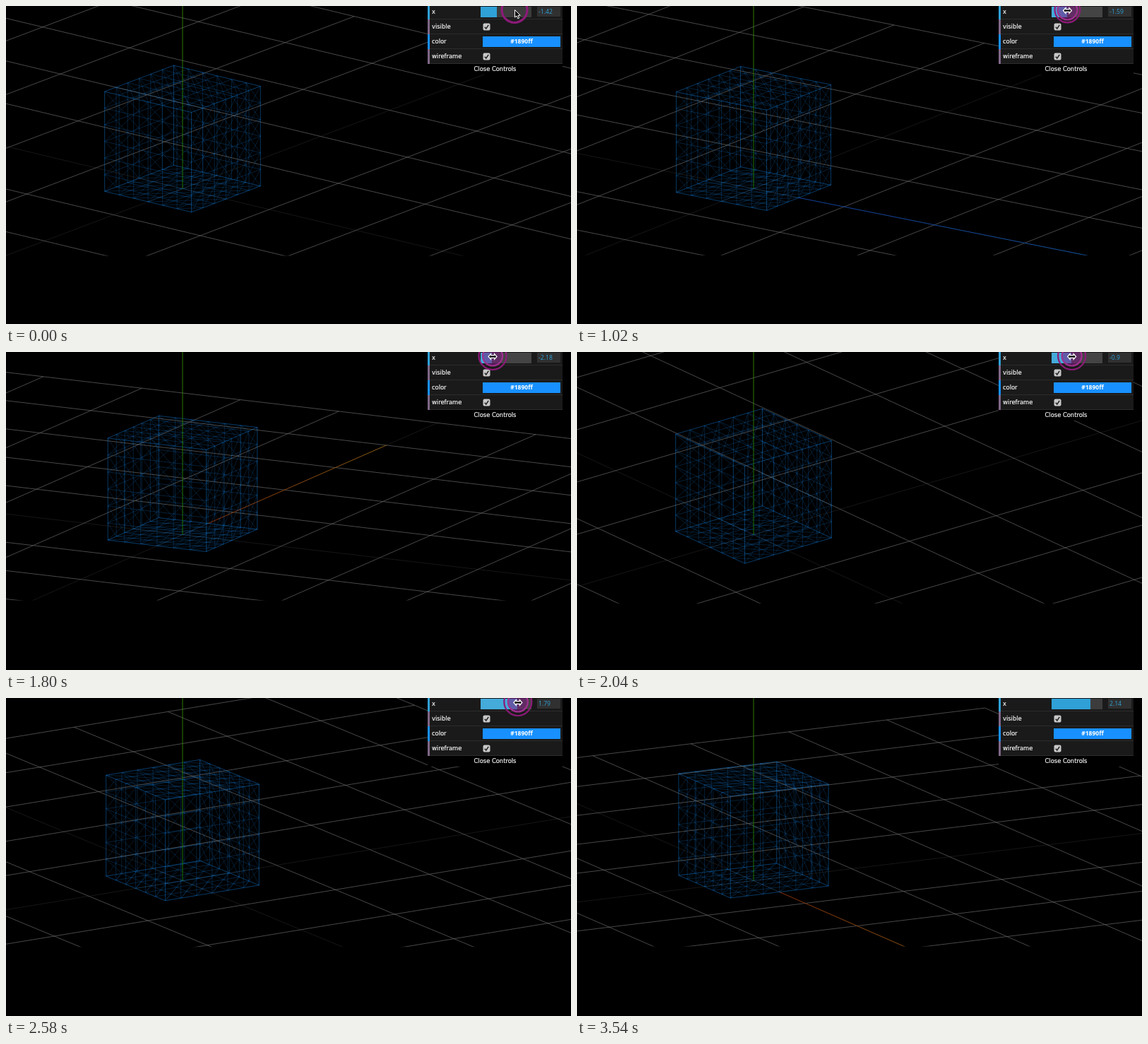
Write an HTML page with a canvas that moves like this. It is 800x450 px and loops after 3.84 s.

```html
<!DOCTYPE html>
<html lang="en">
<head>
<meta charset="utf-8">
<title>Orthographic camera</title>
<style>
html, body { margin: 0; width: 100%; height: 100%; overflow: hidden; background: #000; }
#stage { position: relative; width: 800px; height: 450px; overflow: hidden; }
#stage > * { position: absolute; }
canvas { left: 0; top: 0; }
#gui { left: 597px; top: -2px; width: 191px; font: 8.35px "DejaVu Sans", sans-serif; color: #f4f4f4;
  -webkit-text-stroke: .2px #f4f4f4; }
.row { position: relative; box-sizing: border-box; height: 21px; background: #1a1a1a;
  border-bottom: 1px solid #2c2c2c; }
.row::before { content: ""; position: absolute; width: 2.5px; height: 21px; background: #806787; }
.row > * { position: absolute; }
.row label { left: 6px; top: 0; line-height: 21px; }
.num::before { background: #2fa1d6; }
.hue::before { background: #1890ff; }
#track { left: 75px; top: 3px; width: 72px; height: 15px; background: #3c3c3c; }
#fill { height: 100%; background: #2fa1d6; }
.hover #track { background: #444; }
.hover #fill { background: #44abda; }
#value { left: 155px; top: 3px; width: 33px; height: 14px; padding-left: 2px; box-sizing: border-box;
  background: #303030; color: #2fa1d6; font: 8.6px/14px "Open Sans", sans-serif; -webkit-text-stroke: 0; }
#swatch { left: 78px; top: 3px; width: 110px; height: 14.5px; background: #1890ff; color: #fff;
  text-align: center; font: bold 8.5px/14px "Open Sans", sans-serif; -webkit-text-stroke: 0; }
.check { left: 78px; top: 5px; }
#close { height: 15px; line-height: 15.5px; background: #000; text-align: center; }
#cursor { left: 0; top: 0; overflow: visible; }
</style>
</head>
<body>
<div id="stage">
  <canvas id="view" width="800" height="450"></canvas>
  <div id="gui">
    <div class="row num"><label>x</label><div id="track"><div id="fill"></div></div><div id="value"></div></div>
    <div class="row"><label>visible</label>
      <svg class="check" width="11" height="11"><rect x=".5" y=".5" width="10" height="10" rx="2" fill="#c8c8c8"/><path d="M2.8 5.8 4.8 8 8.2 2.8" fill="none" stroke="#222" stroke-width="1.5"/></svg></div>
    <div class="row hue"><label>color</label><div id="swatch">#1890ff</div></div>
    <div class="row"><label>wireframe</label>
      <svg class="check" width="11" height="11"><rect x=".5" y=".5" width="10" height="10" rx="2" fill="#c8c8c8"/><path d="M2.8 5.8 4.8 8 8.2 2.8" fill="none" stroke="#222" stroke-width="1.5"/></svg></div>
    <div id="close">Close Controls</div>
  </div>
  <svg id="cursor" width="800" height="450">
    <g id="pointer">
      <circle id="ring" fill="none" stroke="#8c1a78"/>
      <circle id="press" r="14" fill="#7a1a80" fill-opacity=".55" stroke="#a0308e" stroke-width="2.2"/>
      <path id="arrow" d="M.5 0V10.6L3 8.4 4.8 12.3 6.6 11.5 4.9 7.7H8.2Z" fill="#000" stroke="#fff" stroke-width="1"/>
      <path id="resize" d="M-6 1-2.5-3V-.8H2.5V-3L6 1 2.5 5V2.8H-2.5V5Z" fill="#111" stroke="#fff" stroke-width="1.2"/>
    </g>
  </svg>
</div>
<script>
const LOOP = 3840, STEP = 60;
const ORIGIN = [250, 258.5], UNIT = 157;
const CAM_Y = 0.573, CAM_Z = 1.13;
const HEIGHT = 0.943, SEGS = 6, GRID = 5, AXIS = 4, NEAR = 90.5;
const GRAB = 960, RELEASE = 3180;

// camera x over time
const KEYS = [[0, -1.42], [GRAB, -1.42], [1020, -1.59], [1440, -2.8], [1560, -3], [1680, -2.7],
  [2040, -0.9], [2280, 0.23], [2580, 1.79], [2760, 2.45], [2880, 2.6], [3060, 2.4], [3240, 2.14], [LOOP, 2.14]];

const $ = id => document.getElementById(id);
const ctx = $('view').getContext('2d');

const rise = i => (KEYS[i + 1][1] - KEYS[i][1]) / (KEYS[i + 1][0] - KEYS[i][0]);

function slope(i) {
  if (i === 0 || i === KEYS.length - 1) return 0;
  const a = rise(i - 1), b = rise(i);
  return a * b <= 0 ? 0 : 2 * a * b / (a + b);
}

function cameraX(t) {
  let i = 0;
  while (i < KEYS.length - 2 && t >= KEYS[i + 1][0]) i++;
  const [t0, a] = KEYS[i], [t1, b] = KEYS[i + 1];
  const d = t1 - t0, u = (t - t0) / d, v = 1 - u;
  return a * v * v * (1 + 2 * u) + b * u * u * (3 - 2 * u)
    + d * u * v * (slope(i) * v - slope(i + 1) * u);
}

function makeCamera(x) {
  const yaw = Math.atan2(x, CAM_Z);
  const sin = Math.sin(yaw), cos = Math.cos(yaw);
  const tilt = CAM_Y / Math.hypot(x, CAM_Y, CAM_Z), up = Math.sqrt(1 - tilt * tilt);
  return {
    project: ([px, py, pz]) => [
      ORIGIN[0] + UNIT * (px * cos - pz * sin),
      ORIGIN[1] + UNIT * (tilt * (px * sin + pz * cos) - py * up)
    ],
    cut: ORIGIN[1] + NEAR / up
  };
}

function strokeLines(cam, lines, style, width) {
  ctx.beginPath();
  for (const [a, b] of lines) {
    ctx.moveTo(...cam.project(a));
    ctx.lineTo(...cam.project(b));
  }
  ctx.strokeStyle = style;
  ctx.lineWidth = width;
  ctx.stroke();
}

function strokeAxis(cam, dir, start, from, to) {
  const root = dir.map(v => v * start), tip = dir.map(v => v * AXIS);
  const fade = ctx.createLinearGradient(...cam.project(root), ...cam.project(tip));
  fade.addColorStop(0, from);
  fade.addColorStop(1, to);
  strokeLines(cam, [[root, tip]], fade, 0.9);
}

const gridLines = [], midLines = [];
for (let i = -GRID; i <= GRID; i++) {
  (i ? gridLines : midLines).push([[i, 0, -GRID], [i, 0, GRID]], [[-GRID, 0, i], [GRID, 0, i]]);
}

// each box face maps (u, v) in 0..1 to a point, v running down
const faces = [
  (u, v) => [u, 1 - v, 1], (u, v) => [1 - u, 1 - v, 0],
  (u, v) => [1, 1 - v, 1 - u], (u, v) => [0, 1 - v, u],
  (u, v) => [u, 1, v], (u, v) => [u, 0, 1 - v]
];
const edges = [], diagonals = [];
for (const face of faces) {
  const at = (i, j) => {
    const [x, y, z] = face(i / SEGS, j / SEGS);
    return [x - 0.5, y * HEIGHT, z - 0.5];
  };
  for (let i = 0; i <= SEGS; i++) {
    edges.push([at(i, 0), at(i, SEGS)], [at(0, i), at(SEGS, i)]);
  }
  for (let i = 0; i < SEGS; i++) {
    for (let j = 0; j < SEGS; j++) diagonals.push([at(i, j + 1), at(i + 1, j)]);
  }
}

function drawScene(x) {
  const cam = makeCamera(x);
  ctx.clearRect(0, 0, 800, 450);
  ctx.save();
  ctx.beginPath();
  ctx.rect(0, 0, 800, cam.cut);
  ctx.clip();
  strokeLines(cam, midLines, '#202020', 0.7);
  strokeLines(cam, gridLines, '#686868', 0.7);
  // the ground axes fight with the grid's middle lines for depth
  if (x < -2.1 || x > 2) strokeAxis(cam, [1, 0, 0], 0.5, '#8c2c00', '#906010');
  if (x > -1.9 && x < -1.5) strokeAxis(cam, [0, 0, 1], 0.5, '#0c3ca0', '#1058a8');
  strokeLines(cam, diagonals, 'rgba(24,144,255,.3)', 0.65);
  strokeLines(cam, edges, 'rgba(24,144,255,.34)', 0.65);
  strokeAxis(cam, [0, 1, 0], 0, '#1c8000', '#5c9000');
  ctx.restore();
}

function drawGui(t, x) {
  const hover = t >= STEP && t < RELEASE, held = t >= GRAB;
  $('gui').className = hover ? 'hover' : '';
  $('fill').style.width = (x + 4) * 9 + 'px';
  $('value').textContent = String(Math.round(x * 100) / 100);

  const grabX = 708.7 + 9 * x;
  const u = Math.min(1, t / GRAB), ease = u * u * (3 - 2 * u);
  const cx = 720 + (grabX - 720) * ease;
  const show = (id, on) => $(id).setAttribute('display', on ? 'inline' : 'none');
  show('pointer', t < RELEASE);
  show('arrow', !hover);
  show('resize', hover);
  show('press', held);
  $('ring').setAttribute('r', held ? 17 + 2.5 * Math.min(1, (t - GRAB) / 180) : 18);
  $('ring').setAttribute('stroke-width', held ? 2.2 : 3.2);
  $('pointer').setAttribute('transform', `translate(${cx} 5.5)`);
}

function frame(now) {
  const t = Math.floor(now % LOOP / STEP) * STEP;
  const x = cameraX(t);
  drawScene(x);
  drawGui(t, x);
  requestAnimationFrame(frame);
}
frame(0);
</script>
</body>
</html>
```
